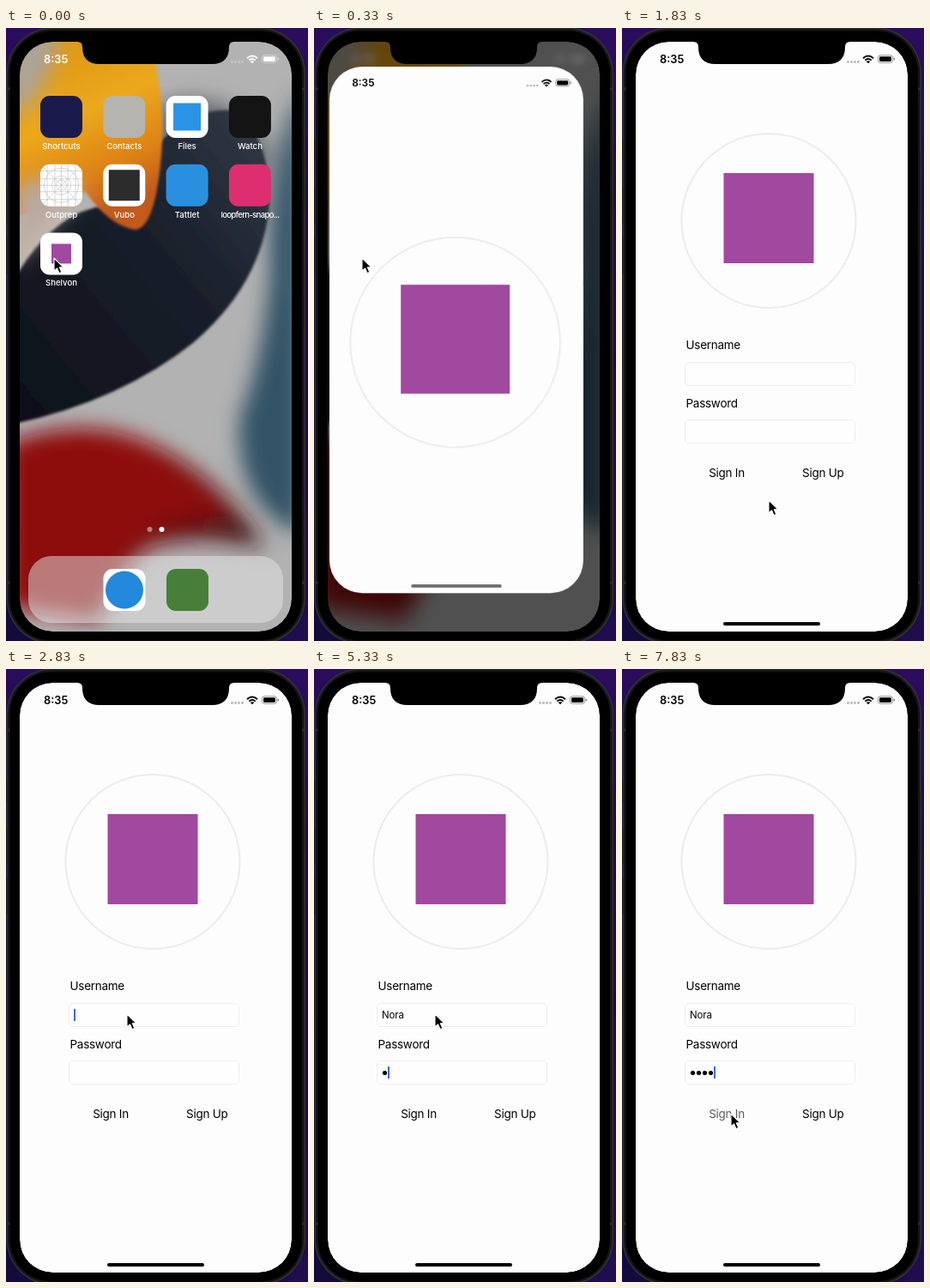
An HTML page that plays this animation: 352x714 px, repeating every 8000 ms.

```html
<!DOCTYPE html>
<html lang="en">
<head>
<meta charset="utf-8">
<title>App launch and sign in</title>
<style>
  :root { --t: 0ms; }
  html, body { margin: 0; width: 100%; height: 100%; overflow: hidden; }
  body {
    position: relative;
    background: linear-gradient(100deg, #0000 60%, #3a107055), linear-gradient(#2a0c5c, #190a48 25%, #110b38 60%, #120b3c);
    font-family: Inter, "Liberation Sans", sans-serif;
  }
  svg, .screen, .app, .layer, .field, .bar, .home { position: absolute; display: block; }
  .stage { left: 0; top: 0; width: 352px; height: 714px; }
  .screen { left: 16px; top: 16px; width: 317px; height: 687px; border-radius: 38px; overflow: hidden; background: #111; }
  .home, .layer { left: -16px; top: -16px; width: 352px; height: 714px; }
  .app {
    left: 0; top: 0; width: 317px; height: 687px; overflow: hidden;
    border-radius: 38px; background: #fdfdfd; transform-origin: 0 0;
  }
  .bar { left: 102px; bottom: 7px; width: 113px; height: 4px; border-radius: 2px; background: #000; }
  .time { font-size: 12.8px; font-weight: 600; }
  .tag { font-size: 9.6px; font-weight: 500; fill: #fff; text-anchor: middle; }
  .label { font-size: 13.5px; letter-spacing: -.02em; }
  .mid { text-anchor: middle; }
  .ring { fill: none; stroke: #ececee; stroke-width: 2; }
  .logo { fill: #a1489f; }
  .field {
    left: 73px; width: 192px; height: 26px; padding-left: 5px; display: flex; align-items: center;
    border: 1px solid #ececec; border-radius: 5px; background: #fefefe; font-size: 11.5px; letter-spacing: -.01em;
  }
  .field i { width: 1.5px; height: 14px; background: #4167dc; visibility: hidden; }
  .field.focus i { visibility: visible; }
  #pass span { height: 7px; background: radial-gradient(circle at 3.5px 3.5px, #000 2.3px, #0000 2.9px) 0 0 / 7px 7px; }

  .home, .shelf, .app, .splash, .login, .bar, .press, .pointer {
    animation: 8s linear calc(-1 * var(--t)) infinite paused;
  }
  .home { animation-name: recede; }
  .shelf { animation-name: vanish; }
  .app { animation-name: open; }
  .splash { animation-name: leave; }
  .login { animation-name: enter; }
  .bar { animation-name: darken; }
  .press { animation-name: press; animation-timing-function: step-end; }
  .pointer { animation-name: point; }

  @keyframes recede {
    0% { filter: blur(0) brightness(1); }
    2.083% { filter: blur(2px) brightness(.7); }
    4.167%, 100% { filter: blur(4px) brightness(.45); }
  }
  @keyframes vanish { 0% { opacity: 1; } 4.167%, 100% { opacity: 0; } }
  @keyframes open {
    0% { opacity: 0; transform: translate(24px, 222px) scale(.155); height: 317px; border-radius: 70px; }
    2.083% { opacity: 1; transform: translate(11px, 104px) scale(.62); height: 613px; border-radius: 52px; }
    4.167% { transform: translate(2px, 29px) scale(.9335); height: 657px; border-radius: 41px; }
    6.25% { transform: translate(0, 4px) scale(.99); height: 683px; border-radius: 39px; }
    8.333%, 100% { opacity: 1; transform: none; height: 687px; border-radius: 38px; }
  }
  @keyframes leave { 0%, 16.667% { opacity: 1; } 20.833%, 100% { opacity: 0; } }
  @keyframes enter { 0%, 16.667% { opacity: 0; } 20.833%, 100% { opacity: 1; } }
  @keyframes darken { 0%, 16.667% { background: #6e6e6e; } 20.833%, 100% { background: #000; } }
  @keyframes press { 0% { fill: #000; } 97.5%, 100% { fill: #5a5a5a; } }
  @keyframes point {
    0%, 6.25% { transform: translate(56px, 268px); }
    8.333% { transform: translate(95px, 350px); }
    10.417% { transform: translate(165px, 520px); }
    12.5%, 18.75% { transform: translate(200px, 598px); }
    22.917%, 25% { transform: translate(171px, 550px); }
    31.25%, 87.5% { transform: translate(141px, 402px); }
    89.583% { transform: translate(138px, 430px); }
    91.667% { transform: translate(131px, 495px); }
    93.75%, 100% { transform: translate(127px, 518px); }
  }
</style>
</head>
<body>

<!-- phone body -->
<svg class="stage" viewBox="0 0 352 714">
  <rect x=".5" y="-.5" width="348.5" height="718" rx="53" fill="#303033"/>
  <rect x="2" y="1" width="345.5" height="715" rx="52" fill="#161617"/>
  <rect x="4.5" y="3.5" width="340.5" height="710" rx="49" fill="#000"/>
  <path d="M.5 71h4M345 71h4M.5 646h4M345 646h4" stroke="#2c2c2f" stroke-width="3"/>
  <path d="M.5 130v24M.5 186v42M.5 244v42M349.5 145v70" stroke="#1b1b1d" stroke-width="1.5"/>
</svg>

<div class="screen">
  <svg class="home" viewBox="0 0 352 714">
    <defs>
      <filter id="soft" x="-50%" y="-50%" width="200%" height="200%"><feGaussianBlur stdDeviation="1.6"/></filter>
      <filter id="haze" x="-50%" y="-50%" width="200%" height="200%"><feGaussianBlur stdDeviation="12"/></filter>
      <linearGradient id="sun" x1="0" y1="0" x2=".35" y2="1">
        <stop stop-color="#d99114"/><stop offset=".5" stop-color="#eba81c"/>
        <stop offset=".8" stop-color="#dd8215"/><stop offset="1" stop-color="#c25a1c"/>
      </linearGradient>
      <linearGradient id="night" x1="0" y1="1" x2="1" y2="0">
        <stop stop-color="#0d0f19"/><stop offset=".6" stop-color="#1a202c"/><stop offset="1" stop-color="#343c48"/>
      </linearGradient>
      <linearGradient id="blood" x1="0" y1="0" x2="1" y2=".4">
        <stop stop-color="#8c0b12"/><stop offset=".5" stop-color="#940b11"/><stop offset="1" stop-color="#3e1512"/>
      </linearGradient>
      <g id="status" fill="currentColor">
        <text class="time" x="44" y="40.6">8:35</text>
        <g opacity=".28">
          <circle cx="263.5" cy="39.5" r="1.4"/><circle cx="267.5" cy="39.5" r="1.4"/>
          <circle cx="271.5" cy="39.5" r="1.4"/><circle cx="275.5" cy="39.5" r="1.4"/>
        </g>
        <path d="M281 35.2q6-5.4 12 0M283.3 37.6q3.7-3.2 7.4 0" fill="none" stroke="currentColor" stroke-width="1.9"/>
        <path d="M284.8 39l2.2 2.2 2.2-2.2q-2.2-1.6-4.4 0z"/>
        <rect x="298.5" y="31.8" width="17" height="8.6" rx="2.6" fill="none" stroke="currentColor" stroke-opacity=".4"/>
        <rect x="300" y="33.3" width="14" height="5.6" rx="1.4"/>
        <rect x="316.6" y="34.6" width="1.3" height="3" rx=".6" opacity=".5"/>
      </g>
    </defs>
    <rect width="352" height="714" fill="#b2b2b2"/>
    <g filter="url(#haze)">
      <path d="M180 90Q262 64 306 140L290 230H160z" fill="#60666d"/>
      <path d="M345 70Q304 150 308 290Q298 390 272 455Q268 560 345 590z" fill="#315366"/>
      <path d="M10 160L80 150 70 240 10 290z" fill="#c9bdb4"/>
    </g>
    <path d="M10 292Q60 205 130 206Q190 90 262 96Q308 120 307 205Q300 296 219 366Q134 434 10 461z" fill="url(#night)" filter="url(#soft)"/>
    <path d="M10 10H166Q188 80 180 160Q172 234 150 235Q120 230 92 190Q62 206 10 220z" fill="url(#sun)" filter="url(#soft)"/>
    <path d="M0 0H62Q56 76 0 108z" fill="#aaa49a" filter="url(#haze)"/>
    <path d="M10 185Q66 160 92 192Q60 214 10 275z" fill="#b9aaa0" filter="url(#haze)"/>
    <g filter="url(#haze)">
      <path d="M0 484Q90 448 168 484Q248 520 302 606Q220 586 164 606Q126 640 108 690L0 675z" fill="url(#blood)"/>
      <path d="M16 500Q90 464 165 495Q225 522 262 570Q170 560 130 620L98 668H16z" fill="#8d0a10"/>
    </g>
    <g class="shelf">
      <circle cx="167.5" cy="584" r="3" fill="#fff" opacity=".45"/>
      <circle cx="181.5" cy="584" r="3" fill="#fff"/>
      <rect x="26" y="615" width="297" height="78" rx="27" fill="#e6e6e6" fill-opacity=".5"/>
      <g id="icons"></g>
    </g>
    <use href="#status" color="#fff"/>
  </svg>

  <div class="app">
    <div class="layer splash">
      <svg class="stage" viewBox="0 0 352 714">
        <circle class="ring" cx="173" cy="360" r="131"/>
        <rect class="logo" x="105" y="288" width="136" height="136"/>
      </svg>
    </div>
    <div class="layer login">
      <svg class="stage" viewBox="0 0 352 714">
        <circle class="ring" cx="171" cy="224.5" r="101.5"/>
        <rect class="logo" x="118.5" y="169" width="105" height="105"/>
        <g class="label">
          <text x="74.5" y="374">Username</text>
          <text x="74.5" y="441.5">Password</text>
          <text class="mid press" x="122" y="523">Sign In</text>
          <text class="mid" x="234.3" y="523">Sign Up</text>
        </g>
      </svg>
      <div class="field" id="user" style="top:388.5px"><span></span><i></i></div>
      <div class="field" id="pass" style="top:456px"><span></span><i></i></div>
    </div>
    <svg class="layer" viewBox="0 0 352 714"><use href="#status" color="#000"/></svg>
    <div class="bar"></div>
  </div>
</div>

<svg class="stage" viewBox="0 0 352 714">
  <path d="M83 14V16Q89 16 89 22Q89 42 109 42H240Q260 42 260 22Q260 16 266 16V14z"/>
  <g class="pointer">
    <path d="M0 0V15L3.5 11.8 6 17.6 8.8 16.4 6.3 10.8H11z" stroke="#fff" stroke-width="1.1" stroke-linejoin="round"/>
  </g>
</svg>

<script>
  const LOOP = 8000, STEP = 1000 / 6;
  const SIZE = 49;
  const $ = s => document.querySelector(s);

  // label, tile colour, mark colour, mark size
  const apps = [
    ['Shortcuts', '#1a1a4c'], ['Contacts', '#b5b4ae'], ['Files', '#fff', '#2b93e6', 32], ['Watch', '#141414'],
    ['Outprep', '#fff'], ['Vubo', '#fff', '#2c2c2c', 36], ['Tattlet', '#2b8fe0'], ['loopfern-snapo...', '#dd2f70'],
    ['Shelvon', '#fff', '#a1489f', 23]
  ];

  const tile = (x, y, fill) => `<rect x="${x}" y="${y}" width="${SIZE}" height="${SIZE}" rx="11" fill="${fill}"/>`;

  function blueprint(x, y) {
    const c = SIZE / 2;
    const lines = [8, 17, c, 32, 41].map(d => `M0 ${d}H${SIZE}M${d} 0V${SIZE}`).join('');
    const rings = [6, 11, 20].map(r => `<circle cx="${c}" cy="${c}" r="${r}"/>`).join('');
    return `<g transform="translate(${x} ${y})" fill="none" stroke="#c4c4c4" stroke-width=".7">
      <path d="${lines}M3 3L46 46M46 3L3 46"/>${rings}</g>`;
  }

  function icon([label, fill, mark, size], i) {
    const x = 40 + (i % 4) * 73.3, y = 79 + Math.floor(i / 4) * 79.7;
    const cx = x + SIZE / 2, inset = (SIZE - size) / 2;
    let art = tile(x, y, fill);
    if (mark) art += `<rect x="${x + inset}" y="${y + inset}" width="${size}" height="${size}" fill="${mark}"/>`;
    if (label === 'Outprep') art += blueprint(x, y);
    const tight = label.length > 10 ? ' letter-spacing="-.7"' : '';
    return `${art}<text class="tag" x="${cx}" y="${y + 62}"${tight}>${label}</text>`;
  }

  $('#icons').innerHTML = apps.map(icon).join('') +
    tile(113.5, 630, '#fff') + '<circle cx="138" cy="654.5" r="22" fill="#2389dc"/>' +
    tile(187, 630, '#477f3a');

  const typed = [[0, ''], [3330, 'n'], [3500, 'no'], [3830, 'nor'], [4000, 'nora'], [4830, 'Nora']];
  const dots = [5170, 5500, 5830, 6170];
  const FOCUS = 2660, NEXT = 4830;

  function draw() {
    // the picture advances six times a second
    const t = Math.floor((performance.now() - start + 4) % LOOP / STEP) * STEP;
    const now = t + 5;
    document.documentElement.style.setProperty('--t', t + 'ms');
    $('#user span').textContent = typed.findLast(k => k[0] <= now)[1];
    $('#pass span').style.width = dots.filter(d => d <= now).length * 7 + 'px';
    $('#user').classList.toggle('focus', now >= FOCUS && now < NEXT);
    $('#pass').classList.toggle('focus', now >= NEXT);
    requestAnimationFrame(draw);
  }

  const start = performance.now();
  draw();
</script>
</body>
</html>
```
